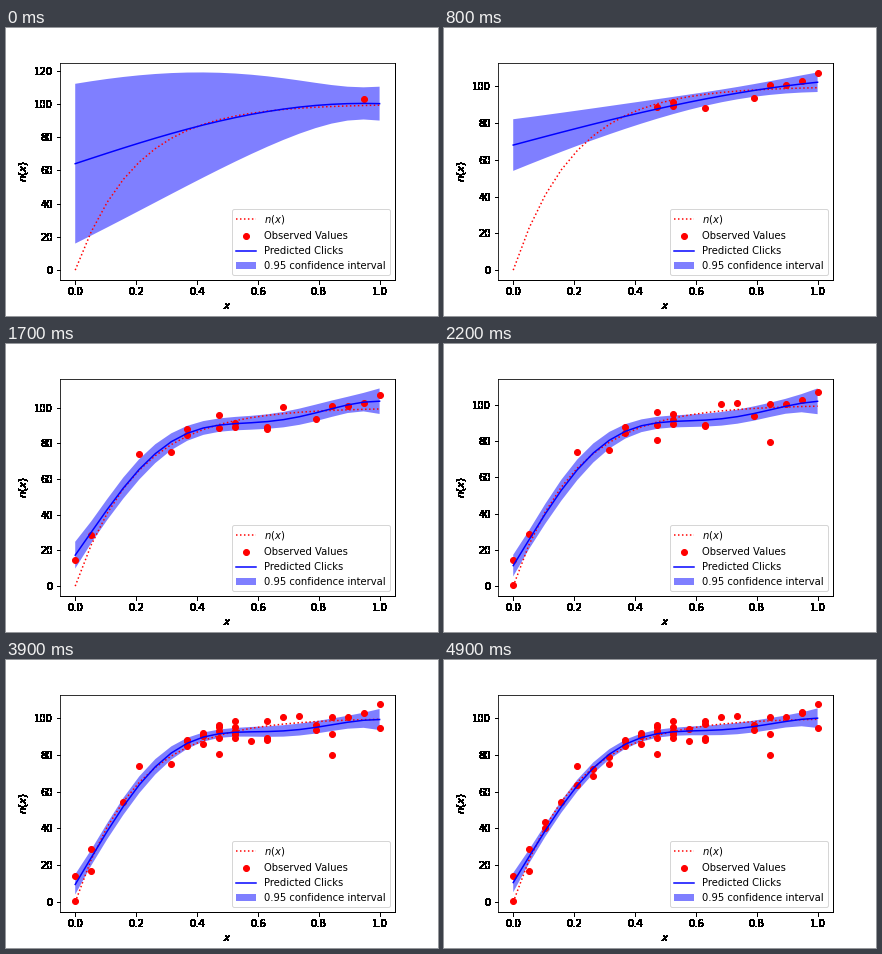
A matplotlib script for the animation above (5 s loop, 432 px wide and 288 px high).

```python
import numpy as np
import matplotlib.pyplot as plt
from matplotlib.animation import FuncAnimation

FRAMES, INTERVAL = 50, 100
SIGNAL_VAR, NOISE_VAR = 1000.0, 25.0
LENGTHS = np.geomspace(0.1, 10, 120)

# Observations in order of arrival: (grid index, measured clicks)
SAMPLES = np.array([
    (18, 102.9), (16, 100.8), (10, 91.5), (19, 107.4), (15, 93.7),
    (12, 88.3), (17, 100.8), (9, 88.9), (10, 89.4),
    (1, 28.9), (4, 74.0), (6, 75.1), (7, 84.7), (12, 89.2),
    (7, 87.9), (9, 96.1), (0, 14.4), (13, 100.4), (9, 80.7),
    (0, 0.6), (10, 95.0), (14, 101.1), (16, 79.7),
    (8, 91.8), (15, 96.0), (8, 85.8), (10, 92.8), (9, 95.0),
    (16, 91.3), (8, 90.4), (7, 87.5), (10, 91.5),
    (11, 87.5), (19, 94.5), (1, 16.9), (10, 98.3), (9, 93.0),
    (3, 54.3), (12, 98.3), (8, 91.0),
    (2, 43.4), (11, 94.0), (5, 72.2), (18, 103.3), (6, 78.8),
    (12, 96.7), (4, 63.5), (9, 92.3), (2, 40.2), (5, 68.4),
])

grid = np.linspace(0, 1, 20)


def rbf(a, b, length):
    return SIGNAL_VAR * np.exp(-(a[:, None] - b) ** 2 / (2 * length ** 2))


def best_length(x, y):
    """Length scale that maximises the marginal likelihood."""
    if len(x) == 1:
        return 1.0
    cov = rbf(x, x, LENGTHS[:, None, None]) + NOISE_VAR * np.eye(len(x))
    weights = np.linalg.solve(cov, y[None, :, None])[..., 0]
    return LENGTHS[np.argmin(weights @ y + np.linalg.slogdet(cov)[1])]


def predict(x, y):
    """Gaussian process mean and standard deviation on the grid."""
    length = best_length(x, y)
    cov = rbf(x, x, length) + NOISE_VAR * np.eye(len(x))
    cross = rbf(grid, x, length)
    gain = np.linalg.solve(cov, cross.T).T
    var = SIGNAL_VAR - np.sum(gain * cross, axis=1)
    return gain @ y, np.sqrt(np.maximum(var, 0))


def solid_black(img, dpi):
    """Turn every touched pixel fully black, without antialiasing."""
    out = np.zeros(img.shape)
    out[..., 3] = img[..., 3] > 0
    return out, 0, 0


fig = plt.figure(figsize=(6, 4), dpi=72, facecolor="white")
fig.subplots_adjust(left=0.125, right=0.9, bottom=0.125, top=0.88)
ax = fig.add_subplot()

ax.plot(grid, 100 * (1 - np.exp(-5 * grid)), "r:", label="$n(x)$")
dots, = ax.plot([], [], "ro", label="Observed Values")
mean_line, = ax.plot([], [], "b-", label="Predicted Clicks")
band, = ax.fill([0, 1, 1], [0, 0, 1], alpha=0.5, fc="b", ec="None",
                label="0.95 confidence interval")
ax.set_xlabel("$x$")
ax.set_ylabel("$n(x)$")
ax.legend(loc="lower right")
for artist in (ax.xaxis, ax.yaxis, ax.spines["bottom"], ax.spines["right"]):
    artist.set_agg_filter(solid_black)


def update(frame):
    index, y = SAMPLES[:frame + 1].T
    x = grid[index.astype(int)]
    mean, std = predict(x, y)
    low, high = mean - 1.96 * std, mean + 1.96 * std

    dots.set_data(x, y)
    mean_line.set_data(grid, mean)
    band.set_xy(np.column_stack([np.r_[grid, grid[::-1]],
                                 np.r_[low, high[::-1]]]))
    ax.relim()
    ax.autoscale_view()
    return dots, mean_line, band


anim = FuncAnimation(fig, update, frames=FRAMES, interval=INTERVAL,
                     repeat=True, repeat_delay=0)
plt.show()
```
